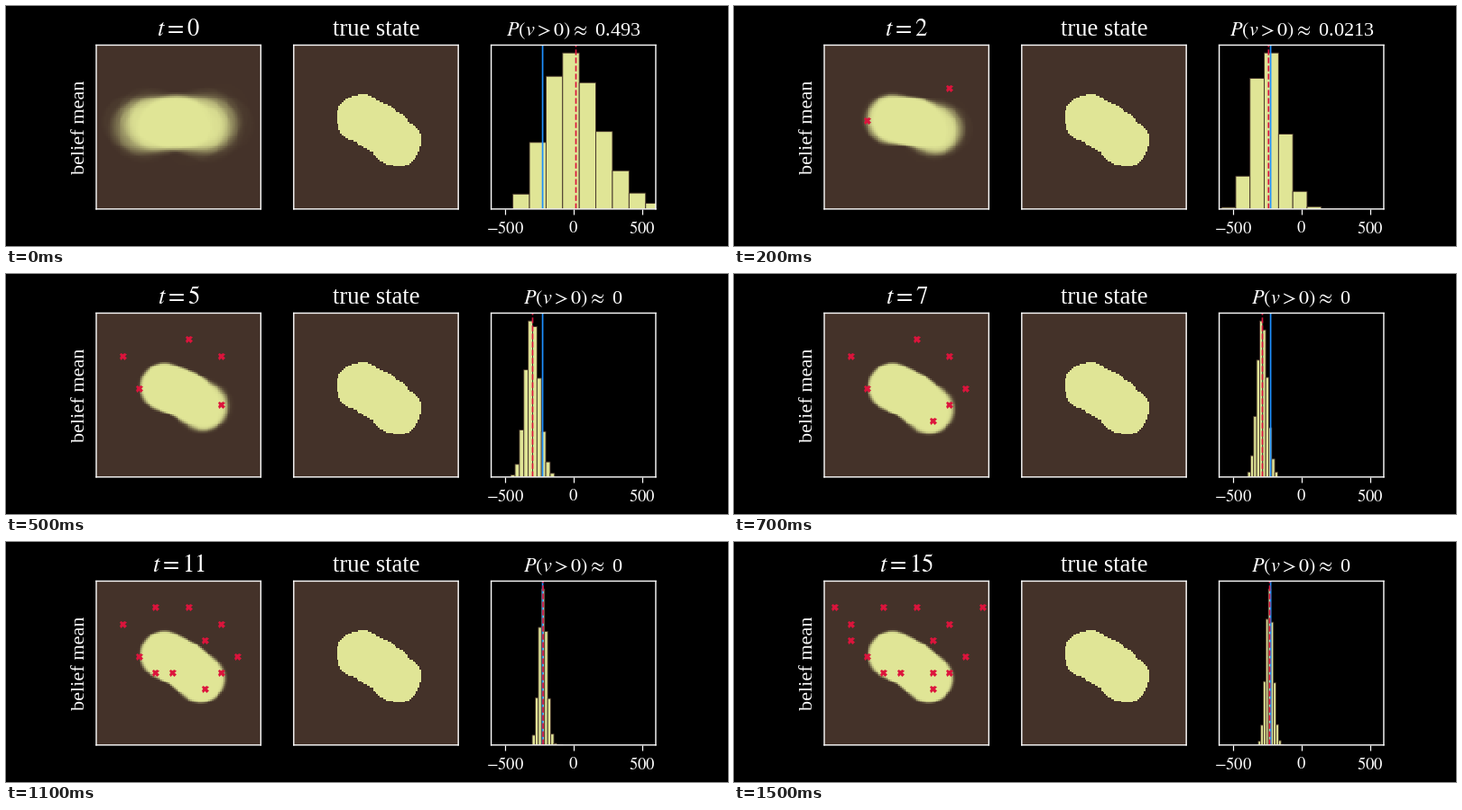
A matplotlib script that plays this animation: 800 px wide and 267 px high, repeating every 1600 ms.

```python
import numpy as np
import matplotlib.pyplot as plt
from matplotlib.animation import FuncAnimation
from matplotlib.colors import LinearSegmentedColormap

W, H, DPI = 800, 267, 100
SIDE, TOP = 182.35, 43.5
LEFTS = (100, 318.8, 537.6)
CELLS, BINS, FRAMES = 100, 10, 16
PT = 72 / DPI  # points per pixel

BROWN, CREAM = "#443229", "#e0e596"
RED, BLUE = "#dc143c", "#1e90ff"

plt.rcParams.update({
    "font.family": "Liberation Serif",
    "mathtext.fontset": "stix",
    "text.color": "white",
    "axes.edgecolor": "white",
    "axes.linewidth": 1.4 * PT,
    "xtick.color": "white",
})

# Estimate of v: mean, bin width, and bins lying left of the mean
KEY_TIMES = (0, 1, 3, 5, 7, 11, 15)
MEANS = (18, -130, -350, -298, -285, -222, -232)
WIDTHS = (121, 99, 109, 32, 22, 22.6, 18.5)
LEADS = (3.8, 4.2, 4.4, 5, 4.9, 3.5, 4.5)
TRUE_V = -225
PROBS = ("0.493", "0.157", "0.0213", "0.00111")

# Column and row of each probe, in order of appearance
PROBES = np.array([
    (2, 4), (7, 2), (1, 2), (7, 5), (5, 1), (8, 4), (6, 6), (3, 5),
    (6, 3), (4, 5), (3, 1), (1, 3), (6, 5), (9, 1), (0, 1),
])

CENTRES = (np.arange(CELLS) + 0.5) * SIDE / CELLS
X, Y = np.meshgrid(CENTRES, CENTRES)

rng = np.random.RandomState(4)
half = rng.randn(3, 60, 2) * (1, 0.7)
NOISE = np.concatenate([half, -half], axis=1)


def joints(t):
    """Left end, middle and right end of the bent capsule."""
    angle = np.radians(33.5) * (1 - (1 - min(t / 9, 1)) ** 2)
    along = np.array([np.cos(angle), np.sin(angle)])
    across = np.array([along[1], -along[0]])
    length = 48 + 17.5 * np.exp(-t)
    left = np.array([75.3, 82.3]) + np.array([-19.5, 6.5]) * np.exp(-1.5 * t)
    return left, left + along * length / 2 + across * 2.8, left + along * length


def segment_distance(p, q):
    """Distance of every cell to each sampled segment p-q."""
    px, py = p.T[:, :, None, None]
    dx, dy = (q - p).T[:, :, None, None]
    u = np.clip(((X - px) * dx + (Y - py) * dy) / (dx * dx + dy * dy), 0, 1)
    return np.hypot(X - px - u * dx, Y - py - u * dy)


def capsule_distance(a, m, b):
    return np.minimum(segment_distance(a, m), segment_distance(m, b))


def belief(t):
    spreads = (1.2 + 7.3 * np.exp(-0.7 * t),
               0.7 + 2 * np.exp(-0.5 * t),
               1.1 + 7.6 * np.exp(-0.3 * t))
    pts = [p + s * z for p, s, z in zip(joints(t), spreads, NOISE)]
    radius = 26.5 + 3 * np.exp(-t)
    edge = (capsule_distance(*pts) - radius) / 2.5
    return np.clip(0.5 - edge, 0, 1).mean(axis=0)


def true_state():
    a, m, b = (p[None] - (1.5, 0.5) for p in joints(FRAMES))
    theta = np.arctan2(Y - m[0, 1], X - m[0, 0])
    return capsule_distance(a, m, b)[0] < 26.7 + 0.7 * np.sin(9 * theta)


def histogram(t):
    """Mean, bin edges and heights of a bell whose skew fades with time."""
    mean, width, lead = (np.interp(t, KEY_TIMES, k)
                         for k in (MEANS, WIDTHS, LEADS))
    edges = mean + (np.arange(BINS) - lead) * width
    sd = 27 + 175 * np.exp(-t / 2.5)
    shape = 16 + 10 * t * t
    g = np.maximum(1 + (edges + width / 2 - mean) / sd / np.sqrt(shape), 1e-6)
    heights = np.exp((shape - 1) * np.log(g) - shape * (g - 1))
    return mean, width, edges, heights / heights.max()


fig = plt.figure(figsize=(W / DPI, H / DPI), dpi=DPI, facecolor="black")


def panel(left):
    ax = fig.add_axes([left / W, 1 - (TOP + SIDE) / H, SIDE / W, SIDE / H])
    ax.set_facecolor("black")
    ax.set_yticks([])
    for spine in ax.spines.values():
        spine.set_snap(False)
    return ax


def title(left, text, size):
    return fig.text((left + SIDE / 2) / W, 1 - 32.8 / H, text, fontsize=size,
                    ha="center", va="baseline")


cmap = LinearSegmentedColormap.from_list("belief", [BROWN, CREAM])


def field(left, data):
    ax = panel(left)
    ax.set_xticks([])
    img = ax.imshow(data, cmap=cmap, vmin=0, vmax=1, aspect="auto",
                    interpolation="nearest")
    return ax, img


ax_belief, img = field(LEFTS[0], belief(0))
field(LEFTS[1], true_state())
marks, = ax_belief.plot([], [], "X", color=RED, ms=7 * PT, mew=0.6 * PT,
                        snap=False)

time_text = title(LEFTS[0], "", 19.2)
title(LEFTS[1], "true state", 19.2)
prob_text = title(LEFTS[2], "", 16)
fig.text(87.3 / W, 1 - 134.3 / H, "belief mean", fontsize=16, rotation=90,
         rotation_mode="anchor", ha="center", va="baseline")

ax_hist = panel(LEFTS[2])
ax_hist.set_xlim(-600, 600)
ax_hist.set_ylim(0, 1.05)
ax_hist.set_xticks([-500, 0, 500], ["$-500$", "$0$", "$500$"], fontsize=13.33)
ax_hist.tick_params(axis="x", length=5.5 * PT, width=1.2 * PT, pad=8 * PT)
bars = ax_hist.bar(np.arange(BINS), np.ones(BINS), align="edge", color=CREAM,
                   edgecolor=BROWN, linewidth=0.9 * PT, snap=False)
ax_hist.axvline(TRUE_V, color=BLUE, lw=1.7 * PT, snap=False)
mean_line = ax_hist.axvline(0, color=RED, lw=1.7 * PT, ls="--", snap=False)


def update(t):
    img.set_data(belief(t))
    marks.set_data(*(10 * PROBES[:t] + 5.3).T)
    time_text.set_text(f"$t={t}$")
    prob = PROBS[t] if t < len(PROBS) else "0"
    prob_text.set_text(rf"$P(v>0)\approx$ {prob}")

    mean, width, edges, heights = histogram(t)
    for bar, x, h in zip(bars, edges, heights):
        bar.set_bounds(x, 0, width, h)
    mean_line.set_xdata([mean, mean])
    return []


anim = FuncAnimation(fig, update, frames=FRAMES, interval=100, repeat=True,
                     init_func=lambda: update(0))
plt.show()
```
